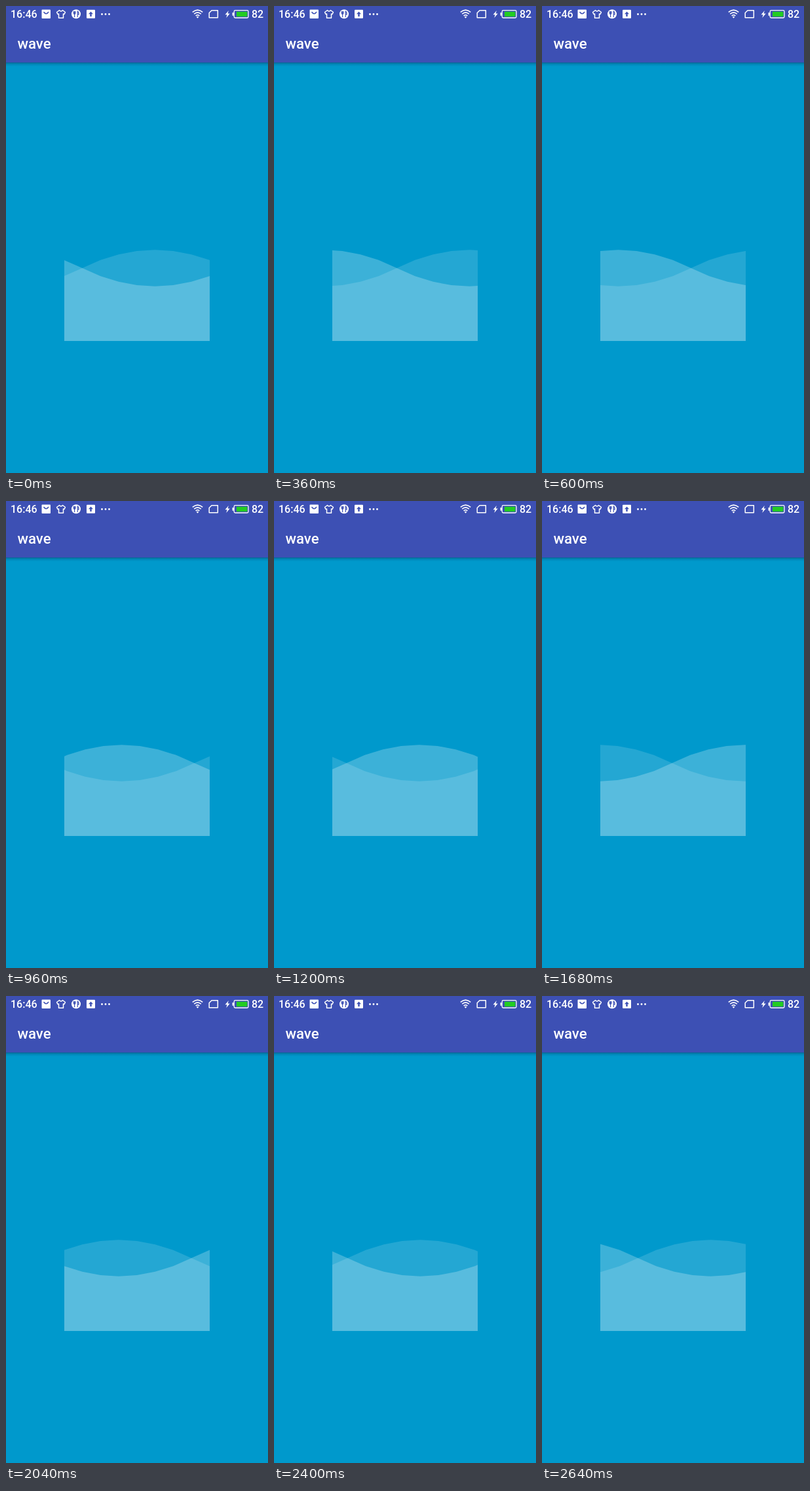
An HTML page that plays this animation: 400 by 711 pixels, repeating every 2.76 s.

```html
<!DOCTYPE html>
<html lang="en">
<head>
<meta charset="utf-8">
<title>wave</title>
<style>
  html, body { margin: 0; width: 100%; height: 100%; overflow: hidden; background: #0099cc; }
  svg { display: block; width: 100vw; height: 100vh; }
  text { font-family: Roboto, "Noto Sans", sans-serif; font-weight: 500; fill: #fff; }
  .line { fill: none; stroke: #fff; }
</style>
</head>
<body>
<svg viewBox="0 0 400 711">
  <defs>
    <linearGradient id="shade" x1="0" y1="0" x2="0" y2="1">
      <stop offset="0" stop-color="#024" stop-opacity=".42"/>
      <stop offset=".4" stop-color="#024" stop-opacity=".16"/>
      <stop offset="1" stop-color="#024" stop-opacity="0"/>
    </linearGradient>
    <clipPath id="box"><rect x="89" y="288" width="222" height="222"/></clipPath>
  </defs>

  <rect width="400" height="711" fill="#0099cc"/>
  <rect y="86" width="400" height="6" fill="url(#shade)"/>
  <rect width="400" height="86" fill="#3d50b4"/>

  <g clip-path="url(#box)" fill="#fff">
    <path id="faint" opacity=".14"/>
    <path id="bright" opacity=".235"/>
  </g>

  <text x="7" y="18" font-size="16">16:46</text>
  <text x="375" y="18" font-size="16">82</text>
  <text x="17.5" y="64.5" font-size="22.2">wave</text>

  <!-- notifications -->
  <rect x="54.5" y="5.500" width="13.500" height="13.500" rx="1" fill="#fff"/>
  <path d="M57.500 9q3.750 5.500 7.500 0" fill="none" stroke="#3d50b4" stroke-width="1.500"/>
  <path class="line" stroke-width="1.500" stroke-linejoin="round"
    d="M81.500 6.500L77.500 9.500L79 12.500L80.500 12V18.300H87.500V12L89 12.500L90.500 9.500L86.500 6.500Q84 9.500 81.500 6.500Z"/>
  <circle cx="107" cy="12.300" r="7" fill="#fff"/>
  <path d="M103.300 8v3q0 1.300 1.300 1.300T106 11V8M104.600 8v9M109.300 17V8q2 1 1.800 4.800h-1.800"
    fill="none" stroke="#3d50b4" stroke-width="1.200"/>
  <rect x="123" y="5.800" width="13" height="13" rx="1" fill="#fff"/>
  <path d="M129.500 8.500L133 12.300H130.700V16H128.300V12.300H126Z" fill="#3d50b4"/>
  <g fill="#fff">
    <circle cx="146.500" cy="12.500" r="1.400"/>
    <circle cx="152" cy="12.500" r="1.400"/>
    <circle cx="157.500" cy="12.500" r="1.400"/>
  </g>

  <!-- signal and power -->
  <path class="line" stroke-width="1.600"
    d="M284.800 9.400Q292.500 2.800 300.200 9.400M287.200 12.200Q292.500 7.600 297.800 12.200M289.600 15Q292.500 12.400 295.400 15"/>
  <path d="M290.700 16.400Q292.500 15 294.300 16.400L292.500 18.700Z" fill="#fff"/>
  <path class="line" stroke-width="1.500" stroke-linejoin="round" d="M314 6.700H323.300V17.800H310.200V10.500Z"/>
  <path d="M339.800 7L334.500 13.200H337.600L336.300 18L341.700 11.600H338.500Z" fill="#fff"/>
  <rect class="line" x="348.200" y="6.700" width="21.800" height="11.300" rx="1.800" stroke-width="1.300"/>
  <rect x="345.600" y="10" width="2" height="4.800" rx=".6" fill="#fff"/>
  <rect x="352" y="8.700" width="16.300" height="7.400" fill="#22cc22"/>
</svg>
<script>
  const LOOP = 2760, STEP = 120;
  const HALF = 222, MID = 399, FLOOR = 510, AMP = 27.75, PARTS = 8;
  const START = 116.5;
  // [step, distance travelled]
  const KEYS = [[0, 0], [3, 71], [8, 171], [12, 261.5], [14, 304], [17, 388.5], [22, 474]];

  const faint = document.getElementById("faint");
  const bright = document.getElementById("bright");

  function travel(step) {
    let i = 1;
    while (i < KEYS.length - 1 && step > KEYS[i][0]) i++;
    const [a, u] = KEYS[i - 1], [b, v] = KEYS[i];
    return u + (v - u) * (step - a) / (b - a);
  }

  // Parabolic half-waves, each flattened into straight parts.
  function wave(shift, sign) {
    const x0 = START + shift % (2 * HALF) - 4 * HALF;
    let d = `M${x0} ${FLOOR}`;
    for (let i = 0; i <= 6 * PARTS; i++) {
      const t = i % PARTS / PARTS;
      const dir = Math.floor(i / PARTS) % 2 ? sign : -sign;
      const y = MID + dir * 4 * AMP * t * (1 - t);
      d += `L${x0 + i * HALF / PARTS} ${y}`;
    }
    return d + `V${FLOOR}Z`;
  }

  function draw(time) {
    const shift = travel(Math.floor(time % LOOP / STEP));
    faint.setAttribute("d", wave(shift, 1));
    bright.setAttribute("d", wave(shift, -1));
  }

  const begin = performance.now();
  function tick() {
    draw(performance.now() - begin);
    requestAnimationFrame(tick);
  }
  tick();
</script>
</body>
</html>
```
